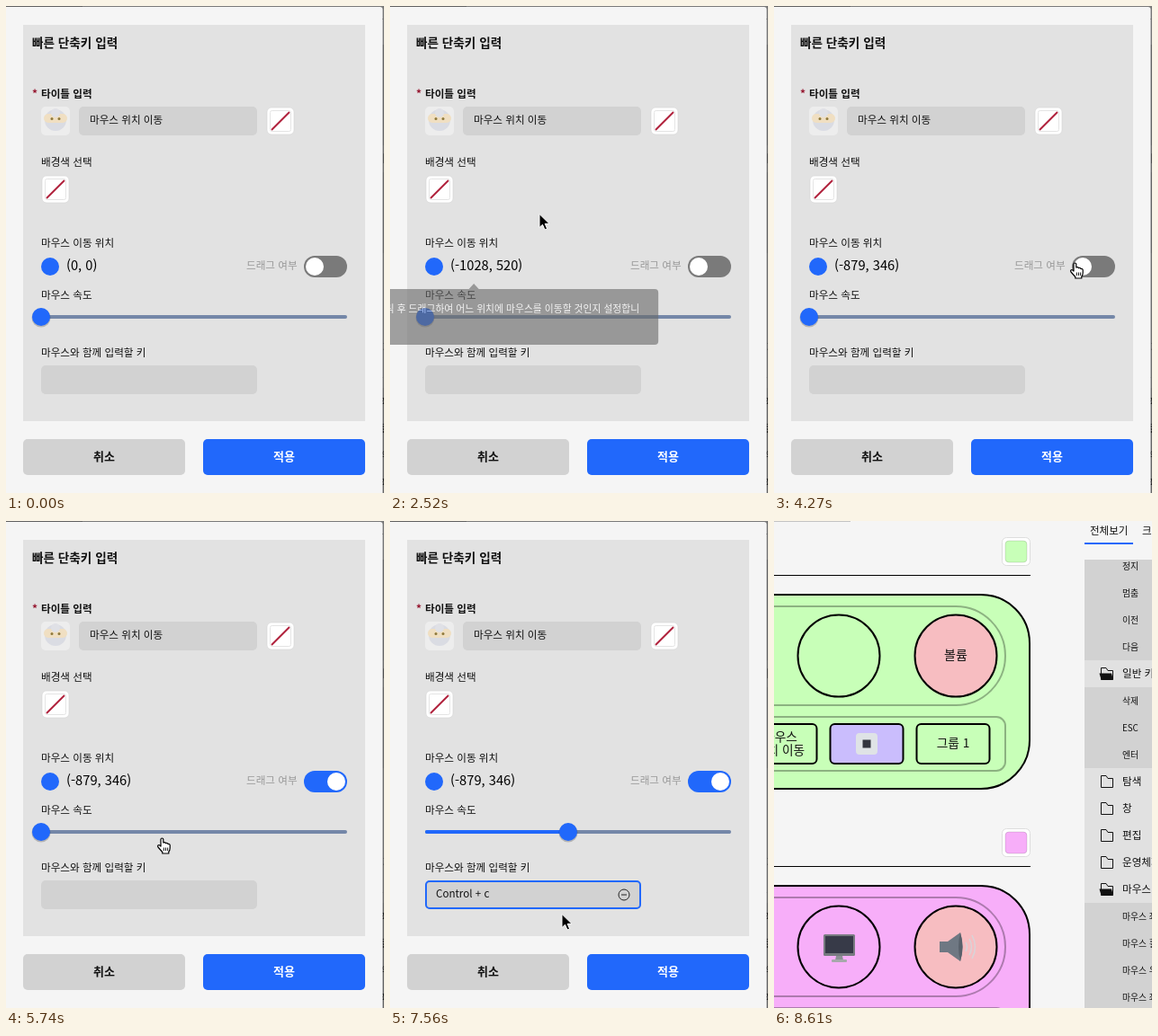
Write an HTML page that moves like this. It is 420 by 542 pixels and loops after 9.45 s.

```html
<!DOCTYPE html>
<html lang="ko">
<head>
<meta charset="utf-8">
<style>
  html, body { margin: 0; width: 100%; height: 100%; overflow: hidden; background: #f5f5f5; }
  svg { display: block; width: 420px; height: 542px; }
  text { font-family: "Noto Sans CJK KR", "Noto Sans CJK", "Noto Sans", sans-serif; white-space: pre; }
</style>
</head>
<body>
<svg id="stage" viewBox="0 0 420 542" xmlns="http://www.w3.org/2000/svg"></svg>
<script>
const LOOP = 9450, STEP = 70;
const BLUE = '#2168fb', GRAY = '#d2d2d2', INK = '#111';

// Shape helpers; text is placed by its vertical centre.
const rect = (x, y, w, h, r, fill, more = '') =>
  `<rect x="${x}" y="${y}" width="${w}" height="${h}" rx="${r}" fill="${fill}" ${more}/>`;
const circle = (x, y, r, fill, more = '') =>
  `<circle cx="${x}" cy="${y}" r="${r}" fill="${fill}" ${more}/>`;
const path = (d, fill, more = '') => `<path d="${d}" fill="${fill}" ${more}/>`;
const text = (s, x, cy, size = 11.6, more = '', fill = INK) =>
  `<text x="${x}" y="${cy + size * 0.36}" font-size="${size}" fill="${fill}" ${more}>${s}</text>`;
const stroke = (color, w = 2) => `stroke="${color}" stroke-width="${w}"`;
const MID = 'text-anchor="middle"', BOLD = 'font-weight="700"', MEDIUM = 'font-weight="500"';

const swatch = (y, fill) =>
  rect(253.5, y + 0.5, 31, 31, 5, '#fff', stroke('#ddd', 1)) +
  rect(257, y + 4, 24, 24, 4, fill, stroke('rgba(0,0,0,.12)', 1));

const panel = (y, fill) =>
  path(`M0 ${y + 60.5}H285`, 'none', stroke('#000', 1)) +
  rect(-200, y + 82, 484, 216, 54, fill, stroke('#000')) +
  rect(-200, y + 95, 457, 110, 55, 'none', stroke('rgba(0,0,0,.3)')) +
  rect(-200, y + 218, 457, 60, 10, 'none', stroke('rgba(0,0,0,.3)')) +
  circle(72, y + 150, 45.5, fill, stroke('#000')) +
  circle(202, y + 150, 45.5, '#f7bdc1', stroke('#000'));

const key = (x, fill) => rect(x, 226, 81, 44, 5, fill, stroke('#000'));

const folder = (y, open) =>
  path(`M363.5 ${y + 6.5}V${y - 6.5}H369l2 3h5.5V${y + 6.5}Z`, 'none', stroke('#111', 1)) +
  (open ? path(`M361.5 ${y - 0.5}H375l2 7H363.5Z`, '#111') : '');

function tree() {
  const subs = ['정지', '멈춤', '이전', '다음', , '삭제', 'ESC', '엔터', , , , , ,
    '마우스 좌클릭', '마우스 휠클릭', '마우스 우클릭', '마우스 좌측'];
  const heads = { 4: '일반 키', 8: '탐색', 9: '창', 10: '편집', 11: '운영체제', 12: '마우스' };
  let out = rect(345, 43, 75, 499, 0, GRAY) +
    rect(345, 155, 75, 30, 0, '#e1e1e1') + rect(345, 275, 75, 150, 0, '#e1e1e1');
  subs.forEach((s, i) => out += text(s, 387, 50 + i * 30, 9.8, MEDIUM));
  for (const i in heads) {
    const y = 50 + i * 30;
    out += folder(y, i == 4 || i == 12) + text(heads[i], 387, y, 11.6, MEDIUM);
  }
  return out + text('전체보기', 351, 11, 11.5, MEDIUM) + text('크기', 409, 11, 11.5) +
    rect(345, 24, 54, 2, 0, BLUE);
}

const monitor =
  rect(55, 460, 35, 24, 1.5, '#777a80') + rect(57, 462, 31, 19, 0, '#373a48') +
  path('M69 484h7l1 5h-9Z', '#8d9095') + rect(64, 488, 17, 3, 1, '#a6a8ab');

const speaker =
  path('M184 468h9l14-10q5 16 0 32l-14-10h-9Z', '#6f7883') +
  path('M207 458q5 16 0 32q-4-16 0-32', '#59616b') +
  path('M213 469q3 5 0 10M217 465q5 9 0 18M220 461q7 13 0 26', 'none', stroke('#d8d4d8', 1.5));

const page =
  rect(0, 0, 420, 542, 0, '#f5f5f5') + rect(0, 0, 85, 1, 0, '#c4c4c4') +
  swatch(18, '#c8ffb8') + panel(0, '#c8ffb8') +
  key(-33.5, '#c8ffb8') + key(62.5, '#cabdfd') + key(158.5, '#c8ffb8') +
  text('볼륨', 202, 149, 14, MID) + text('그룹 1', 199, 247, 13.7, MID) +
  text('마우스', 7, 240, 13.7, MID) + text('위치 이동', 7, 255, 13.7, MID) +
  rect(91, 236, 24, 24, 4, '#dfe3e6') + rect(98.5, 243.5, 9, 9, 0, '#33363f') +
  swatch(342, '#f7aef9') + panel(324, '#f7aef9') + monitor + speaker + tree();

const noColor = (x, y) =>
  rect(x, y, 30, 30, 5, '#fff', stroke('#d4d4d4', 0.6)) +
  rect(x + 3.5, y + 3.5, 23, 23, 2, '#fff', stroke('#e4e4e4', 1)) +
  path(`M${x + 5} ${y + 25}l20-20`, 'none', stroke('#b0213c', 2));

const avatar =
  rect(39, 112, 32, 32, 5, '#ededed') + circle(55, 127, 12, '#dadce3') +
  rect(42, 120, 26, 10, 5, '#f0dfc2') + circle(55, 119, 5, '#e0e1e6') +
  circle(51, 125.5, 1.5, '#8f7a3c') + circle(59, 125.5, 1.5, '#8f7a3c');

const dialog =
  rect(-10, 1, 428.5, 560, 3, '#f5f5f5') + rect(19, 21, 380, 441, 0, '#e2e2e2') +
  text('빠른 단축키 입력', 29, 41, 13.6, BOLD) +
  text('*', 29, 98, 12, BOLD, '#96162f') + text('타이틀 입력', 39, 98, 11.6, BOLD) +
  avatar + rect(81, 112, 198, 32, 5, GRAY) + text('마우스 위치 이동', 93, 127, 11.6, MEDIUM) +
  rect(173.5, 118, 1, 19, 0, '#111', 'id="caret"') + noColor(290, 113) +
  text('배경색 선택', 39, 174, 11.6, MEDIUM) + noColor(40, 189) +
  text('마우스 이동 위치', 39, 264, 11.6, MEDIUM) + circle(49, 290, 10, BLUE) +
  text('(0, 0)', 67, 289, 14.7, 'id="coords" font-weight="300"', '#000') +
  text('드래그 여부', 267, 289, 11.6, '', '#999') +
  rect(331, 278, 48, 24, 12, '#7a7a7a', 'id="toggle"') + circle(343, 290, 10, '#fff', 'id="dot"') +
  text('마우스 속도', 39, 322, 11.6, MEDIUM) +
  rect(39, 344, 340, 4, 2, '#7487a8') + rect(39, 344, 0, 4, 2, BLUE, 'id="filled"') +
  `<g id="knob">${circle(0, 0, 18, BLUE, 'id="halo" opacity=".16"')}` +
  `${circle(0, 1, 10.5, 'rgba(0,0,0,.2)')}${circle(0, 0, 10, BLUE)}</g>` +
  text('마우스와 함께 입력할 키', 39, 386, 11.6, MEDIUM) +
  rect(39, 400, 240, 32, 5, GRAY) +
  rect(40, 401, 238, 30, 4, 'none', stroke(BLUE) + ' id="focus"') +
  text('', 51, 415, 11.6, 'id="typed"') +
  `<g id="clear">${circle(260, 416, 6, 'none', stroke('#222', 1))}` +
  `${path('M257 416h6', 'none', stroke('#222', 1))}</g>` +
  rect(19, 482, 180, 40, 5, GRAY) + text('취소', 109, 501, 13, BOLD + MID) +
  rect(219, 482, 180, 40, 5, BLUE) + text('적용', 309, 501, 13, BOLD + MID, '#fff') +
  `<g id="tip">${path('M-6 315.5L0 309L6 315.5Z', '#6a6a6a')}${rect(-205, 315, 410, 62, 4, '#6a6a6a')}` +
  text('원을 클릭 후 드래그하여 어느 위치에 마우스를 이동할 것인지 설정합니', 184, 337, 10.8,
    MEDIUM + ' text-anchor="end"', '#fff') + '</g>';

const cursors =
  `<g id="arrow">${path('M1 .5V15.5L4.5 12.3L7 18L9.6 16.9L7.2 11.3H12Z', '#000',
    stroke('#fff', 1) + ' stroke-linejoin="round"')}</g>` +
  `<g id="hand">${path('M5 10V2.5Q5 1 6.4 1Q7.8 1 7.8 2.5V6Q9.8 5 10.5 6.7Q12.4 5.9 13 7.6' +
    'Q15.2 7 15.2 9V12Q15.2 14.6 13.8 16V18H6.8V16.5L2 11Q1 9.4 2.4 8.7Q3.6 8.3 5 10Z', '#fff',
    stroke('#000', 1.2) + ' stroke-linejoin="round"')}` +
  `${path('M8.4 11.5V15M10.5 11.5V15M12.6 11.5V15', 'none', stroke('#000', 0.9))}</g>` +
  `<g id="beam">${path('M1 1Q4.5 1 4.5 3.5Q4.5 1 8 1M4.5 3V16M1 18Q4.5 18 4.5 15.5Q4.5 18 8 18',
    'none', stroke('#222', 1.1))}</g>`;

document.getElementById('stage').innerHTML = page +
  rect(0, 0, 420, 542, 0, '#000', 'id="shade"') + `<g id="dialog">${dialog}</g>` + cursors;

// Pointer route: time, left, top, shape from here on.
const ROUTE = [
  [70, 302, 484, 'hand'], [140, 285, 445, 'arrow'], [420, 148, 160, 'arrow'],
  [490, 126, 126, 'beam'], [560, 119, 118, 'beam'], [700, 119, 118, 'beam'],
  [840, 112, 146, 'arrow'], [1120, 60, 272, 'arrow'], [1190, 50, 290, 'hand'],
  [1470, 47, 293, 'hand'], [1820, 47, 293, 'hand'], [2240, 51, 295, 'hand'],
  [2380, 51, 295, 'hand'], [2450, 105, 262, 'arrow'], [2520, 165, 231, 'arrow'],
  [2800, 240, 150, 'arrow'], [3080, 268, 102, 'arrow'], [3150, 268, 102, 'arrow'],
  [3640, 280, 76, 'arrow'], [3780, 280, 76, 'arrow'], [4060, 312, 215, 'arrow'],
  [4270, 328, 285, 'hand'], [4550, 345, 293, 'hand'], [5180, 345, 293, 'hand'],
  [5320, 310, 306, 'arrow'], [5740, 167, 352, 'hand'], [5810, 167, 346, 'hand'],
  [6020, 250, 466, 'hand'], [6300, 293, 484, 'hand'], [6580, 191, 356, 'hand'],
  [6650, 191, 385, 'arrow'], [6720, 191, 403, 'beam'], [7210, 191, 403, 'beam'],
  [7280, 191, 424, 'arrow'], [7420, 190, 437, 'arrow'], [7560, 190, 437, 'arrow'],
  [7840, 245, 464, 'arrow'], [7910, 245, 464, 'arrow'], [8050, 250, 482, 'hand'],
  [8260, 251, 490, 'hand'], [8610, 251, 490, null]
];

const $ = Object.fromEntries([...document.querySelectorAll('[id]')].map(e => [e.id, e]));
const ramp = (t, a, b) => Math.min(1, Math.max(0, (t - a) / (b - a)));
const show = (el, on) => el.setAttribute('visibility', on ? 'visible' : 'hidden');
const move = (el, x, y) => el.setAttribute('transform', `translate(${x} ${y})`);

function pointer(t) {
  const i = ROUTE.findLastIndex(r => r[0] <= t);
  if (i < 0) return { x: 0, y: 0, shape: null };
  const a = ROUTE[i], b = ROUTE[i + 1] || a;
  const u = a === b ? 0 : ramp(t, a[0], b[0]);
  return { x: a[1] + (b[1] - a[1]) * u, y: a[2] + (b[2] - a[2]) * u, shape: a[3] };
}

function coords(t) {
  if (t < 2450) return '(0, 0)';
  const p = pointer(Math.min(t, 3640));
  return `(${Math.round(-879 + (p.x - 280) * 1.296)}, ${Math.round(346 + (p.y - 76) * 1.123)})`;
}

function draw(t) {
  const p = pointer(t);
  for (const shape of ['arrow', 'hand', 'beam']) {
    show($[shape], p.shape === shape);
    move($[shape], p.x, p.y);
  }

  $.coords.textContent = coords(t);
  move($.tip, (106 + $.coords.getComputedTextLength()) / 2, 0);
  $.tip.setAttribute('opacity', 0.92 * (ramp(t, 1190, 1400) - ramp(t, 2450, 2660)));

  const on = ramp(t, 5040, 5250);
  $.toggle.setAttribute('fill', on > 0 ? BLUE : '#7a7a7a');
  $.dot.setAttribute('cx', 343 + 24 * on);

  const dragging = t >= 5810 && t <= 6580;
  const knob = t < 5810 ? 39 : dragging ? p.x + 7 : 198;
  move($.knob, knob, 346);
  $.filled.setAttribute('width', knob - 39);
  show($.halo, dragging);

  show($.focus, t >= 6720 && t < 8260);
  $.typed.textContent = t < 7140 ? '' : t < 7280 ? 'Control' : 'Control + c';
  show($.clear, t >= 7140);
  show($.caret, t >= 8260);

  const fade = t < 8260 ? 1 : (1 - ramp(t, 8190, 8470)) ** 1.75;
  $.dialog.setAttribute('opacity', fade);
  $.shade.setAttribute('opacity', fade / 2);
}

const start = performance.now();
function tick() {
  const t = (performance.now() - start) % LOOP;
  draw(Math.floor(t / STEP) * STEP);
  requestAnimationFrame(tick);
}
tick();
</script>
</body>
</html>
```
